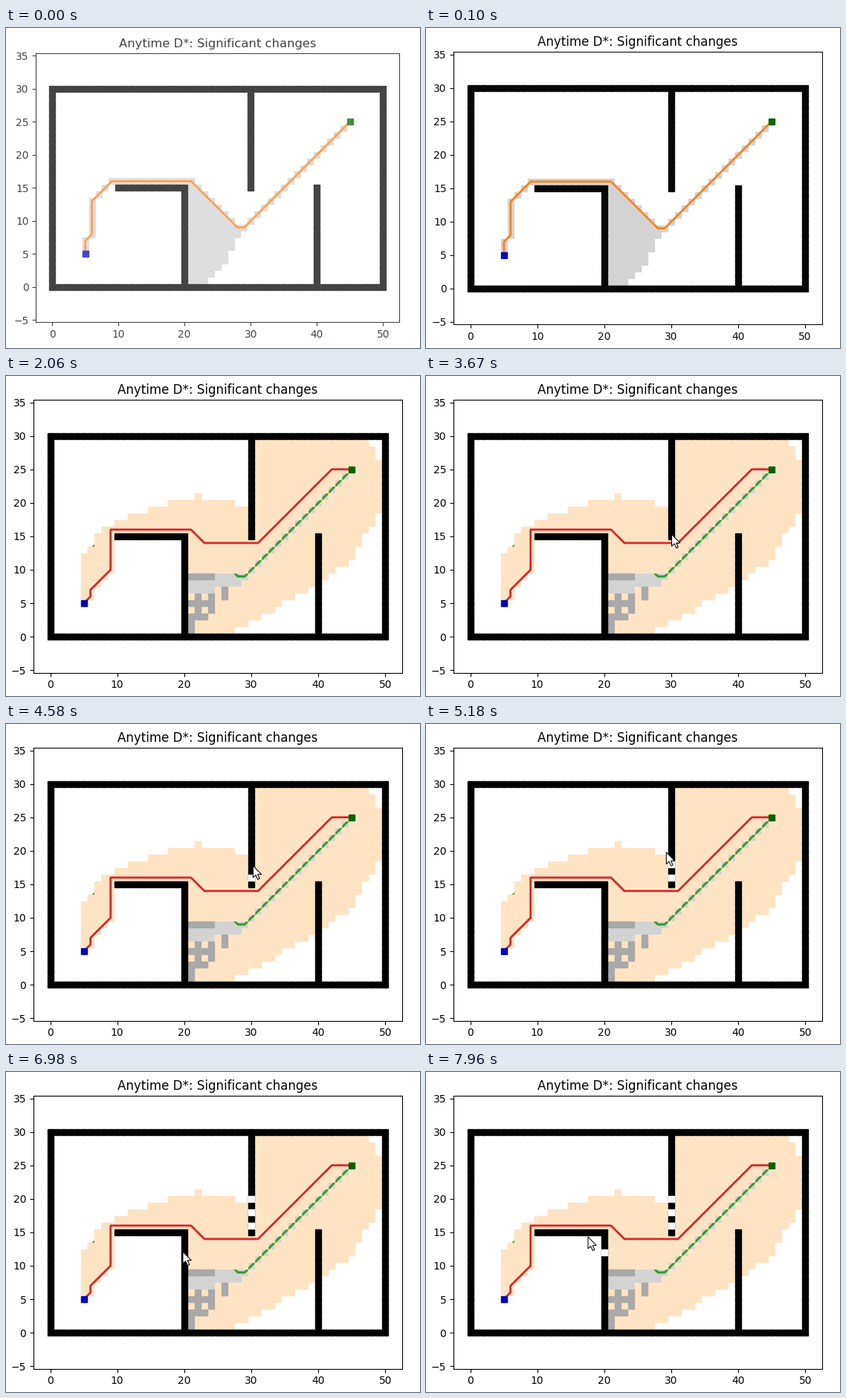
These frames come from a looping animation (557x431 px, 8000 ms). A matplotlib script:

```python
from math import dist, sqrt

import numpy as np
import matplotlib.pyplot as plt
from matplotlib.animation import FuncAnimation
from matplotlib.patches import Polygon, Rectangle
from matplotlib.transforms import Affine2D

W, H, DPI = 557, 431, 100
LOOP, STEP = 8000, 50
GREEN_AT, RED_AT, CURSOR_AT = 510, 2060, 3060
LEFT, RIGHT, TOP, BOTTOM = 37, 533, 32.24, 399.53   # axes box, in pixels from the top left
START, GOAL = (5, 5), (45, 25)

plt.rcParams["font.family"] = "DejaVu Sans"
fig = plt.figure(figsize=((W + .01) / DPI, (H + .01) / DPI), dpi=DPI, facecolor="white")
ax = fig.add_axes([0, 0, 1, 1])
half_height = (BOTTOM - TOP) / (RIGHT - LEFT) * 55 / 2
ax.set(xlim=(-2.5, 52.5), ylim=(15 - half_height, 15 + half_height),
       xticks=range(0, 51, 10), yticks=range(-5, 36, 5))
title = ax.set_title("Anytime D*: Significant changes", fontsize=12)


def row(y, first, last):
    return {(x, y) for x in range(first, last + 1)}


def col(x, first, last):
    return {(x, y) for y in range(first, last + 1)}


def trace(points):
    """All grid cells on a polyline of straight and diagonal segments."""
    cells = set()
    for (x0, y0), (x1, y1) in zip(points, points[1:]):
        n = max(abs(x1 - x0), abs(y1 - y0))
        cells |= {(x0 + (x1 - x0) * i // n, y0 + (y1 - y0) * i // n)
                  for i in range(n + 1)}
    return cells


def cost(*points):
    """Length of an eight-way grid walk through the points."""
    total = 0
    for (x0, y0), (x1, y1) in zip(points, points[1:]):
        short, long = sorted((abs(x1 - x0), abs(y1 - y0)))
        total += long + (sqrt(2) - 1) * short
    return total


def cost_from_goal(cell):
    """Walk from the goal, around the ends of the inner walls."""
    x, y = cell
    if x >= 30 or (x > 20 and y < 15):
        return cost(GOAL, cell)
    if x >= 10:
        return cost(GOAL, (29, 14), cell)
    return cost(GOAL, (29, 14), (9, 16), cell)


def squares(cells, color, z):
    xs, ys = zip(*sorted(cells))
    return ax.plot(xs, ys, "s", color=color, ms=6, zorder=z)[0]


def route(points, color, z):
    return ax.plot(*zip(*points), color=color, lw=2, zorder=z)[0]


# Map and routes
walls = (row(0, 0, 50) | row(30, 0, 50) | col(0, 0, 30) | col(50, 0, 30)
         | row(15, 10, 20) | col(20, 0, 15) | col(30, 15, 30) | col(40, 0, 15))
inside = {(x, y) for x in range(1, 50) for y in range(1, 30)} - walls
first_route = [START, (5, 7), (6, 8), (6, 13), (9, 16), (21, 16),
               (28, 9), (29, 9), GOAL]
second_route = [START, (6, 6), (6, 7), (9, 10), (9, 16), (21, 16),
                (23, 14), (31, 14), (42, 25), GOAL]

# Greedy first search: the heuristic counts double
visited = trace(first_route) | {
    (x, y) for x, y in inside
    if x > 20 and x + y <= 37 and y < 16 and cost(GOAL, (x, y)) + 2 * dist(START, (x, y)) < 71}

# Cells revisited by the first improvement
revisited = row(7, 25, 27)
for y in range(1, 7):
    revisited |= row(y, 21, min(20 + y, 25))
for y in range(9, 13):
    revisited |= row(y, 21, 33 - y)

# Search after the map change: all cells no dearer than the best route
remaining = (row(9, 21, 24) | col(26, 6, 7) | col(24, 4, 6) | col(22, 4, 6)
             | row(5, 21, 24) | row(3, 21, 23) | col(21, 1, 2))
untouched = (row(9, 25, 29) | row(8, 21, 28) | row(7, 21, 24)
             | trace([(29, 9), GOAL]))
best = cost_from_goal(START)
behind_wall = {(x, y) for x, y in inside if 10 <= x < 20 and y < 15}
flooded = {cell for cell in inside - behind_wall - remaining - untouched - {START}
           # ties go to the cells on the left
           if cost_from_goal(cell) + dist(START, cell) + .001 * cell[0] < best + .0065}

squares(visited, "lightgray", 1)
route(first_route, "tab:orange", 3)
green_route = route(first_route, "tab:green", 3.1)
revisited_cells = squares(revisited, "darkgray", 2)
flooded_cells = squares(flooded, "bisque", 4)
remaining_cells = squares(remaining, "darkgray", 4.1)
squares(walls, "black", 5)
red_route = route(second_route, "tab:red", 6)
squares({START}, "#0000be", 7)
squares({GOAL}, "darkgreen", 7)

erased = [(time, squares({cell}, "white", 8)) for time, cell in
          [(4180, (30, 16)), (4880, (30, 18)), (5510, (30, 20)), (7030, (20, 12))]]

# Pointer in stage pixels, y pointing down
pixels = Affine2D().scale(1 / DPI, -1 / DPI).translate(0, H / DPI) + fig.dpi_scale_trans
arrow = np.array([(0, 0), (0, 16), (3.7, 12.6), (6.3, 18.5), (8.8, 17.4),
                  (6.2, 11.7), (11.3, 11.7)])
pointer = fig.add_artist(Polygon(arrow, fc="white", ec="black", lw=.75,
                                 transform=pixels, zorder=20))
stops = np.array([  # time, x, y
    (3060, 403, 392), (3480, 340, 235), (3670, 330, 212), (3890, 331, 209),
    (4180, 321, 203), (4680, 336, 187), (4780, 336, 187), (5230, 321, 170),
    (5460, 322, 168), (5610, 338, 148), (5750, 338, 148), (5850, 331, 183),
    (6400, 238, 243), (6980, 238, 242), (7780, 218, 222)])

veil = fig.add_artist(Rectangle((0, 0), 1, 1, transform=fig.transFigure,
                                fc="white", ec="none", zorder=30))


def set_scale(s):
    """Scale the whole plot about the window's centre."""
    cx, cy = 265, 170
    left, right = (cx + s * (x - cx) for x in (LEFT, RIGHT))
    top, bottom = (cy + s * (y - cy) for y in (TOP, BOTTOM))
    ax.set_position([left / W, 1 - bottom / H, (right - left) / W, (bottom - top) / H])
    title.set_fontsize(12 * s)
    ax.tick_params(labelsize=10 * s, length=3.5 * s, pad=3.5 * s, width=.8 * s)
    for spine in ax.spines.values():
        spine.set_linewidth(.8 * s)
    for line in ax.lines:
        line.set_markersize(6 * s)
        line.set_markeredgewidth(s)
        line.set_linewidth(2 * s)


def update(i):
    t = i * STEP + 10
    opening = max(0, 1 - i / 3) ** 2
    if i < 4:
        set_scale(1 - .0133 * opening)
        veil.set_alpha(.27 * opening)
    green_route.set_visible(t >= GREEN_AT)
    revisited_cells.set_visible(GREEN_AT <= t < RED_AT)
    for artist in (flooded_cells, remaining_cells, red_route):
        artist.set_visible(t >= RED_AT)
    for start, gap in erased:
        gap.set_visible(t >= start)
    pointer.set_visible(t >= CURSOR_AT)
    times, xs, ys = stops.T
    pointer.set_xy(arrow + (np.interp(t, times, xs), np.interp(t, times, ys)))
    return []


def init():
    return update(0)


anim = FuncAnimation(fig, update, frames=LOOP // STEP, interval=STEP,
                     init_func=init, repeat=True, repeat_delay=0, blit=False)
plt.show()
```
